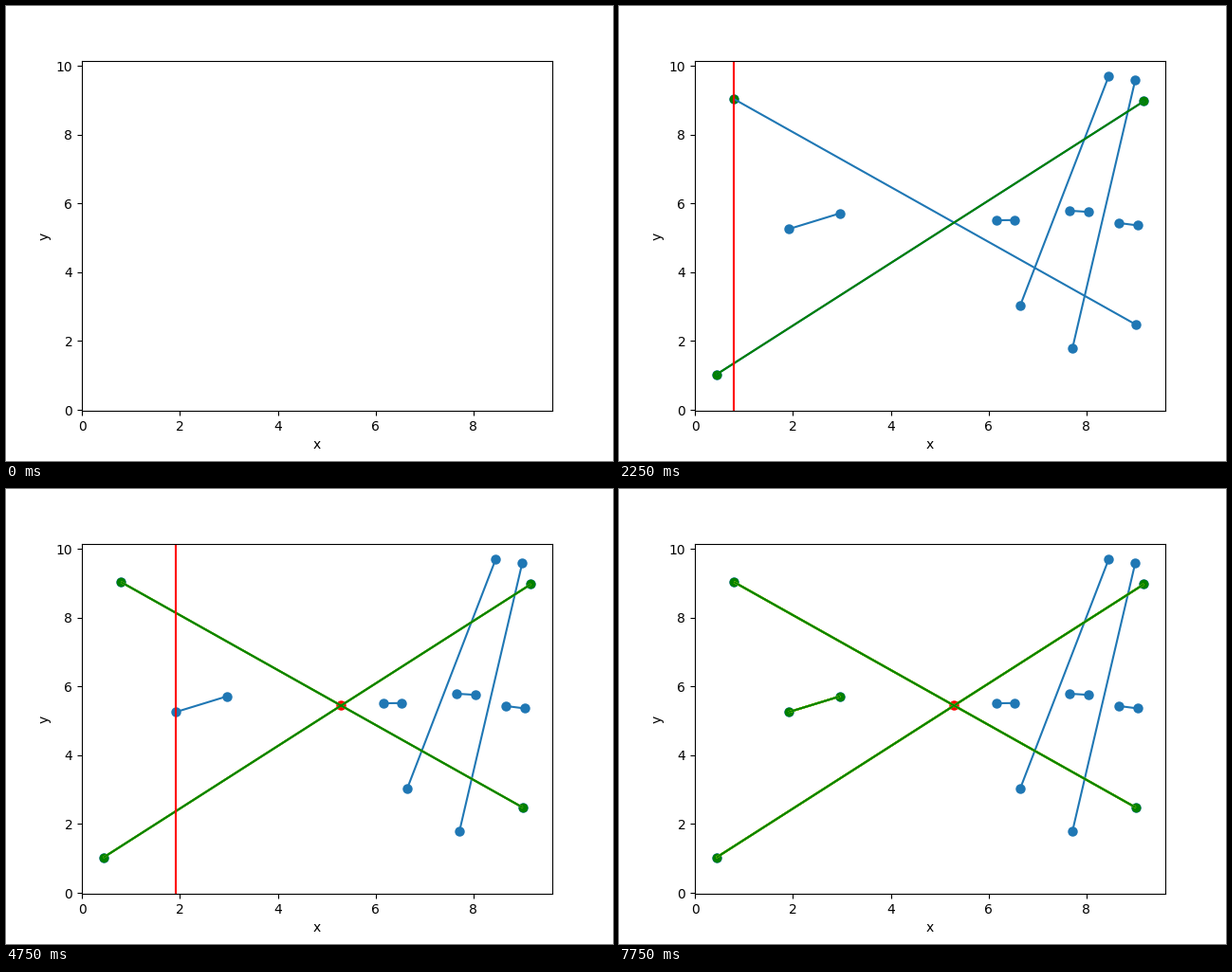
A matplotlib script for the animation above (8000 ms loop, 640x480 px).

```python
import numpy as np
import matplotlib.pyplot as plt
from matplotlib.animation import FuncAnimation

FRAMES = 32
STEP_MS = 250

# Left and right end of each segment; the sweep reaches the first three.
SEGMENTS = np.array([
    [(0.43, 1.024), (9.18, 8.973)],
    [(0.794, 9.034), (9.012, 2.481)],
    [(1.914, 5.256), (2.967, 5.715)],
    [(6.164, 5.512), (6.539, 5.517)],
    [(7.664, 5.788), (8.046, 5.755)],
    [(8.673, 5.43), (9.055, 5.361)],
    [(6.649, 3.032), (8.457, 9.69)],
    [(7.716, 1.783), (9.003, 9.591)],
])

fig, ax = plt.subplots(figsize=(6.4, 4.8), dpi=100)

# Both axes start at the leftmost x and get a five percent margin.
low = SEGMENTS.min()
high = SEGMENTS.max(axis=(0, 1))
pad = 0.05 * (high - low)
ax.set_xlim(low - pad[0], high[0] + pad[0])
ax.set_ylim(low - pad[1], high[1] + pad[1])
ax.set_xlabel("x")
ax.set_ylabel("y")

timeline = []  # (artist, first visible frame, frame at which it goes)


def show(artist, start, end=FRAMES):
    timeline.append((artist, start, end))


def dot(points, color, start, edge=1.5):
    xs, ys = np.atleast_2d(points).T
    show(ax.scatter(xs, ys, color=color, linewidths=edge), start)


def line(seg, color, start):
    artist, = ax.plot(*seg.T, color=color, solid_capstyle="butt")
    show(artist, start)


def crossing(s, t):
    d, e = s[1] - s[0], t[1] - t[0]
    k, _ = np.linalg.solve(np.column_stack([d, -e]), t[0] - s[0])
    return s[0] + k * d


def sweep(seg, start, end):
    """Stop the sweep line at a left end and activate its segment."""
    show(ax.axvline(seg[0, 0], color="red"), start, end)
    dot(seg[0], "green", start + 1, edge=1)
    line(seg, "green", start + 2)
    dot(seg[1], "green", start + 3, edge=1)


def compare(s, t, start, hold):
    """Paint two segments yellow in turn, then green again in turn."""
    for i, seg in enumerate((s, t)):
        line(seg, "yellow", start + i)
    for i, seg in enumerate((s, t)):
        line(seg, "green", start + hold + i)


rising, falling, short = SEGMENTS[:3]

dot(SEGMENTS.reshape(-1, 2), "tab:blue", 1)
for seg in SEGMENTS:
    line(seg, "tab:blue", 2)

sweep(rising, 3, 7)

sweep(falling, 8, 18)
compare(rising, falling, 12, 4)
dot(crossing(rising, falling), "red", 14)

sweep(short, 19, 31)
compare(rising, short, 23, 2)
compare(falling, short, 27, 2)


def update(frame):
    for artist, start, end in timeline:
        artist.set_visible(start <= frame < end)
    return [artist for artist, _, _ in timeline]


anim = FuncAnimation(fig, update, frames=FRAMES, interval=STEP_MS,
                     repeat=True, repeat_delay=0, blit=False)
plt.show()
```
